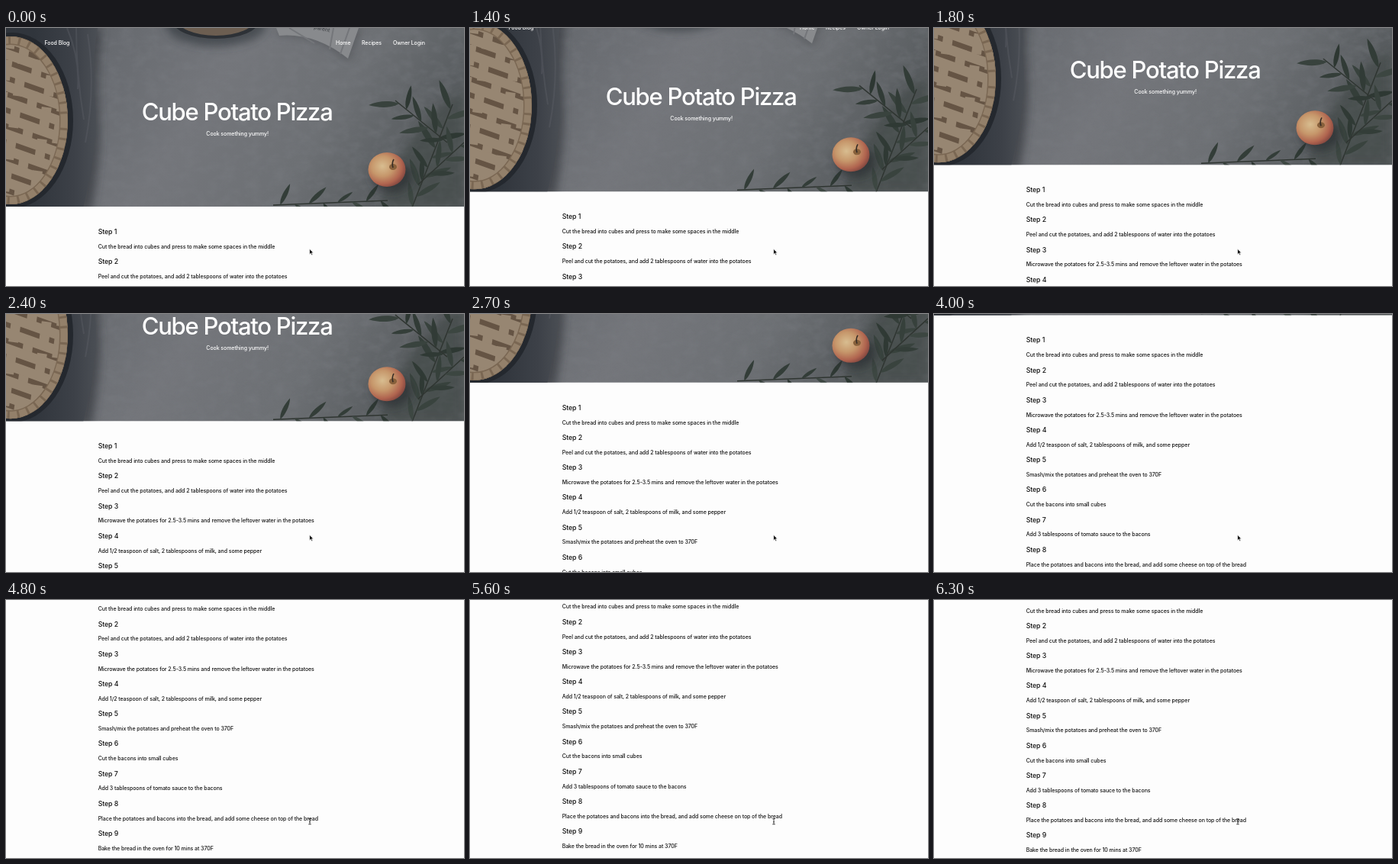
An HTML page that plays this animation: 600x338 px, repeating every 8.6 s.

```html
<!DOCTYPE html>
<html lang="en">
<head>
<meta charset="utf-8">
<title>Food Blog</title>
<style>
  html, body { margin: 0; width: 100%; height: 100%; overflow: hidden; background: #fdfdfd; }
  svg { display: block; width: 100vw; height: 100vh; }
  text { font: 500 7px Inter, Roboto, sans-serif; letter-spacing: -.01em; font-optical-sizing: none; fill: #111; }
  .light text { fill: #fff; }
  text.step { font-size: 8.75px; }
  text.title { font-size: 31px; letter-spacing: -.04em; }
  .mid { text-anchor: middle; }
</style>
</head>
<body>
<svg viewBox="0 0 600 338" preserveAspectRatio="none">
  <defs>
    <linearGradient id="stone" x2="1" y2=".25">
      <stop offset="0" stop-color="#55585d"/>
      <stop offset=".25" stop-color="#686b70"/>
      <stop offset=".5" stop-color="#74767b"/>
      <stop offset=".78" stop-color="#6d7074"/>
      <stop offset="1" stop-color="#595d60"/>
    </linearGradient>
    <linearGradient id="cloth" x2="1">
      <stop offset=".3" stop-color="#30353c"/>
      <stop offset=".75" stop-color="#3d4148"/>
      <stop offset="1" stop-color="#4b4f55"/>
    </linearGradient>
    <radialGradient id="apple" cx=".38" cy=".4" r=".65">
      <stop offset="0" stop-color="#d8bd90"/>
      <stop offset=".45" stop-color="#c6976b"/>
      <stop offset=".8" stop-color="#b0644f"/>
      <stop offset="1" stop-color="#854840"/>
    </radialGradient>
    <filter id="blur" x="-30%" y="-30%" width="160%" height="160%"><feGaussianBlur stdDeviation="6"/></filter>
    <filter id="grain" x="0" y="0" width="100%" height="100%">
      <feTurbulence type="fractalNoise" baseFrequency=".06 .09" numOctaves="4" seed="4"/>
      <feColorMatrix values="0 0 0 0 .2  0 0 0 0 .21  0 0 0 0 .23  1.2 0 0 0 -.45"/>
    </filter>
    <clipPath id="heroBox"><rect width="600" height="234"/></clipPath>
    <clipPath id="pieBox"><ellipse cx="6" cy="121" rx="75" ry="110"/></clipPath>
    <path id="leaf" d="M0 0C.4-.28 1.3-.25 2 0C1.4 .26 .5 .25 0 0Z"/>
  </defs>

  <g id="page">
    <g clip-path="url(#heroBox)">
      <rect width="600" height="235" fill="url(#stone)"/>
      <rect width="600" height="235" filter="url(#grain)" opacity=".55"/>

      <path d="M0 0H126Q118 60 122 110T112 240H0Z" fill="#34383e" opacity=".7" filter="url(#blur)"/>
      <path d="M0 0H120Q112 50 117 100T100 240H0Z" fill="url(#cloth)"/>
      <path d="M92 0Q92 60 102 120M107 8Q118 78 104 150M80 0Q97 40 94 80" fill="none" stroke="#5c6067" stroke-width="2" opacity=".4"/>

      <ellipse cx="8" cy="121" rx="80" ry="115" fill="#24282e"/>
      <g clip-path="url(#pieBox)">
        <rect y="5" width="90" height="230" fill="#655444"/>
        <g id="lattice" stroke="#978672" stroke-width="13"/>
        <ellipse cx="6" cy="121" rx="70" ry="105" fill="none" stroke="#7a6753" stroke-width="12"/>
        <ellipse cx="6" cy="121" rx="70" ry="105" fill="none" stroke="#93806a" stroke-width="9" stroke-dasharray="10 3"/>
      </g>

      <ellipse cx="275" cy="-4" rx="66" ry="28" fill="#33373c" opacity=".65" filter="url(#blur)"/>
      <ellipse cx="275" cy="-10" rx="57" ry="24" fill="#2d3136"/>
      <ellipse cx="275" cy="-13" rx="52" ry="23" fill="#6c5e51"/>

      <path d="M352 0L359 11Q405 7 449 44L466 0Z" fill="#44474b" opacity=".5" filter="url(#blur)"/>
      <path d="M354 0L358 10Q405 6 448 40L462 0Z" fill="#888a8d"/>
      <path d="M371 0L404 20M429 0L424 28M450 0L438 34" stroke="#74767a" stroke-width="2"/>
      <text transform="translate(403 1) rotate(12)" style="fill:#45484c">parent</text>

      <path d="M490 235Q520 130 600 80V235Z" fill="#3e4442" opacity=".55" filter="url(#blur)"/>
      <g id="leaves"/>
      <ellipse cx="505" cy="195" rx="27" ry="20" fill="#282c2d" opacity=".65" filter="url(#blur)"/>
      <ellipse cx="499" cy="185.5" rx="24.5" ry="22.5" fill="url(#apple)"/>
      <ellipse cx="507" cy="182" rx="5" ry="4" fill="#87603b"/>
      <path d="M507 183Q505 177 508 172" fill="none" stroke="#342b25" stroke-width="1.6"/>
    </g>

    <g class="light">
      <text x="50.5" y="21.8">Food Blog</text>
      <text x="432" y="21.8">Home</text>
      <text x="466" y="21.8">Recipes</text>
      <text x="507" y="21.8">Owner Login</text>
      <text class="title mid" x="302.6" y="120.9">Cube Potato Pizza</text>
      <text class="mid" x="303.2" y="140.6">Cook something yummy!</text>
    </g>
    <g id="steps"/>
  </g>

  <path id="arrow" d="M397.8 289.6V296.4L399.3 295L400.5 297.6L401.6 297.1L400.4 294.6H402.5Z" stroke="#fff" stroke-width=".5"/>
  <path id="beam" d="M396.2 286.7H399.8M398 286.7V293.8M396.2 293.8H399.8M397 290.8H399" stroke="#222" stroke-width=".8"/>
</svg>
<script>
const LOOP = 8600, TICK = 100;
const $ = id => document.getElementById(id);

function add(parent, tag, attrs, text = '') {
  const el = document.createElementNS('http://www.w3.org/2000/svg', tag);
  for (const key in attrs) el.setAttribute(key, attrs[key]);
  el.textContent = text;
  parent.appendChild(el);
}

let seed = 7;
const random = () => (seed = seed * 16807 % 2147483647) / 2147483647;

[
  'Cut the bread into cubes and press to make some spaces in the middle',
  'Peel and cut the potatoes, and add 2 tablespoons of water into the potatoes',
  'Microwave the potatoes for 2.5-3.5 mins and remove the leftover water in the potatoes',
  'Add 1/2 teaspoon of salt, 2 tablespoons of milk, and some pepper',
  'Smash/mix the potatoes and preheat the oven to 370F',
  'Cut the bacons into small cubes',
  'Add 3 tablespoons of tomato sauce to the bacons',
  'Place the potatoes and bacons into the bread, and add some cheese on top of the bread',
  'Bake the bread in the oven for 10 mins at 370F'
].forEach((line, i) => {
  const y = 270 + 39.2 * i;
  add($('steps'), 'text', { class: 'step', x: 120.7, y }, `Step ${i + 1}`);
  add($('steps'), 'text', { x: 120.7, y: y + 18.8 }, line);
});

// Woven pastry strips
for (let i = 0; i < 12; i++) {
  add($('lattice'), 'path', { d: `M-5 ${i * 21 - 10}l90 32` });
  add($('lattice'), 'path', { d: `M${i * 20 + 8} 0l-34 240`, 'stroke-dasharray': '27 15', 'stroke-dashoffset': i * 21 });
}

// A stem with leaves on alternating sides
function sprig(x0, y0, x1, y1, count, size) {
  const heading = Math.atan2(y1 - y0, x1 - x0) * 180 / Math.PI;
  add($('leaves'), 'path', { d: `M${x0} ${y0}L${x1} ${y1}`, stroke: '#2f3531', 'stroke-width': 1.5 });
  for (let i = 0; i < count; i++) {
    const u = (i + .5) / count;
    const angle = heading + (i % 2 ? 1 : -1) * (30 + 35 * random());
    const shade = 48 + 18 * random();
    add($('leaves'), 'use', {
      href: '#leaf',
      transform: `translate(${x0 + (x1 - x0) * u} ${y0 + (y1 - y0) * u}) rotate(${angle}) scale(${size * (.8 + .4 * random())})`,
      fill: `rgb(${shade - 4},${shade + 6},${shade + 1})`
    });
  }
}
sprig(530, 240, 585, 100, 11, 18);
sprig(578, 150, 510, 95, 7, 17);
sprig(540, 205, 600, 150, 6, 17);
sprig(350, 232, 500, 226, 8, 14);

// Eased scroll of a given distance; a bend below 1 moves the speed to the start.
function glide(t, from, to, distance, bend = 1) {
  const u = Math.min(1, Math.max(0, (t - from) / (to - from))) ** bend;
  return distance * u ** 3 * (10 - 15 * u + 6 * u * u);
}

const scrollAt = t =>
  glide(t, 930, 2100, 61.5) +
  glide(t, 2200, 4500, 173, .47) +
  glide(t, 4350, 4850, 40.5) +
  glide(t, 4850, 5600, 2.3) -
  glide(t, 5600, 6300, 5.1);

const start = performance.now();
function draw() {
  const t = Math.floor((performance.now() - start) % LOOP / TICK) * TICK;
  const overText = t >= 4800;
  $('page').setAttribute('transform', `translate(0 ${-scrollAt(t).toFixed(2)})`);
  $('arrow').style.display = overText ? 'none' : '';
  $('beam').style.display = overText ? '' : 'none';
  requestAnimationFrame(draw);
}
draw();
</script>
</body>
</html>
```
